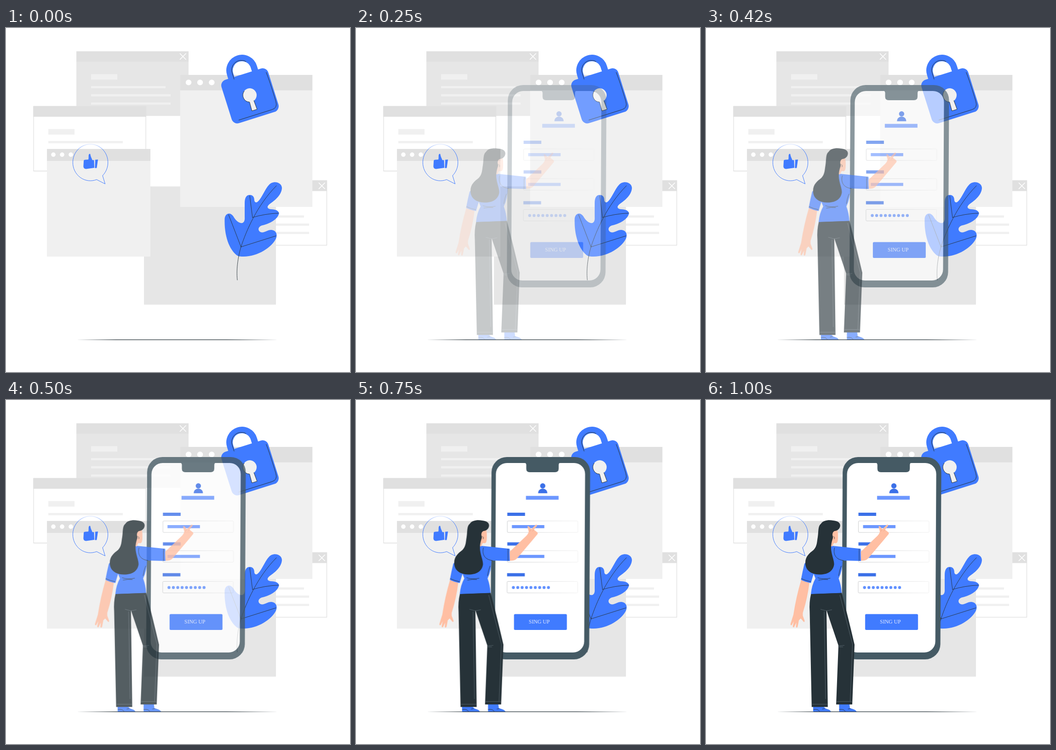
These frames come from a looping animation (748 px wide and 748 px high, 1040 ms). An HTML page:

```html
<!DOCTYPE html>
<html lang="en">
<head>
<meta charset="utf-8">
<title>Sign up</title>
<style>
  html, body { margin: 0; width: 100%; height: 100%; overflow: hidden; background: #fff; }
  svg { display: block; width: 100%; height: 100%; }
  .blue { fill: #407bff; }
  .deep { fill: #3b70e8; }
  .soft { fill: #6c97ff; }
  .dark { fill: #263238; }
  .skin { fill: #ffbfa3; }
  .head { fill: #e0e0e0; }
  .pane { fill: #e6e6e6; }
  .pale { fill: #f0f0f0; }
  .white { fill: #fff; }
  .frame { fill: #fff; stroke: #e0e0e0; stroke-width: 1.3; }
  .line { fill: none; stroke: #263238; stroke-width: .9; stroke-linecap: round; }
  .seam { fill: none; stroke: #64727a; stroke-width: .7; }
  .cross { fill: none; stroke: #fff; stroke-width: 1.6; }
  .field { fill: none; stroke: url(#fade); stroke-width: .9; }
  .label { font: 11.8px "Liberation Serif", "Times New Roman", serif; fill: #e8eeff; text-anchor: middle; }

  /* Slides in from the right with an overshoot, then rests until the loop restarts. */
  .enter { animation: enter 1040ms infinite; }
  @keyframes enter {
    0% { opacity: 0; transform: translateX(44.9px); animation-timing-function: cubic-bezier(.352, .043, .5, 1.373); }
    94.13%, 100% { opacity: 1; transform: translateX(0); }
  }
</style>
</head>
<body>
<svg viewBox="0 0 748 748">
  <defs>
    <linearGradient id="fade">
      <stop offset="0" stop-color="#c4c6c8"/>
      <stop offset="1" stop-color="#efefef"/>
    </linearGradient>
    <linearGradient id="rim" x1="0" y1="0" x2="0" y2="1">
      <stop offset="0" stop-color="#407bff" stop-opacity=".2"/>
      <stop offset=".15" stop-color="#407bff"/>
    </linearGradient>
    <g id="lines" class="pale">
      <path d="M32 49.500h57v12h-57zM32 75.500h162v4.700h-162zM32 93.300h173v4.700h-173zM32 111.300h173v4.700h-173z"/>
    </g>
    <path id="cross" class="cross" d="M225 4.500l13.500 13.500M238.500 4.500L225 18"/>
  </defs>

  <!-- Windows -->
  <g transform="translate(153 50.700)">
    <path class="pane" d="M0 0h244v140.500H0z"/>
    <path class="head" d="M0 0h244v22.500H0z"/>
    <use href="#lines"/>
    <use href="#cross"/>
  </g>
  <g transform="translate(60 170.300)">
    <path class="frame" d="M0 0h244v140.700H0z"/>
    <path class="head" d="M-.6-.6h245.200v23.400H-.6z"/>
    <use href="#lines"/>
  </g>
  <g transform="translate(454 332)">
    <path class="frame" d="M0 0h243.500v140.300H0z"/>
    <path class="head" d="M-.6-.6h244.700v23H-.6z"/>
    <use href="#lines"/>
    <use href="#cross" x="1"/>
  </g>
  <path class="pane" d="M300 344.500h287v257H300z"/>
  <path class="pale" d="M378.700 102h287.500v287H378.700z"/>
  <path class="head" d="M378.700 102h287.500v33.600H378.700z"/>
  <g class="white">
    <circle cx="397" cy="118.400" r="6.200"/>
    <circle cx="422" cy="118.400" r="6.200"/>
    <circle cx="447.300" cy="118.400" r="6.200"/>
  </g>
  <path class="pale" d="M89 263h225v234H89z"/>
  <path class="head" d="M89 263h225v26H89z"/>
  <g class="white">
    <circle cx="103" cy="275.400" r="4.800"/>
    <circle cx="122" cy="275.400" r="4.800"/>
    <circle cx="141" cy="275.400" r="4.800"/>
  </g>

  <!-- Speech bubble -->
  <path d="M197 329.600L215.500 339L210 321A38.200 39.800 0 1 0 197 329.600z" fill="none" stroke="url(#rim)"/>
  <path class="blue" d="M169 289Q169 286.500 172 286.500L179 286C180.500 282 178.500 276 181 274Q183.500 272 183.800 277C184.500 281 187 284 187.500 287L191.500 287.500L192 304L174 306.500Q168.500 306 168.300 301zM194 286.500L200 286L197.300 304.500L193.200 304.500z"/>

  <!-- Lock -->
  <g transform="translate(530.500 147.500) rotate(-17.500)">
    <path d="M-27-42V-58A27 27 0 0 1 27-58V-42" fill="none" stroke="#407bff" stroke-width="14"/>
    <rect class="blue" x="-53.300" y="-49.500" width="106.600" height="99" rx="13"/>
    <path class="line" d="M-22-45V-58A21 21 0 0 1 14-74"/>
    <path class="line" d="M49-38Q50.500-20 50 28Q50 43 37 43H-39"/>
    <path class="pale" d="M-5 12.600A15 15 0 1 1 5 12.600L6 32.500H-5.800z"/>
    <path class="line" d="M5 12.600L6 32.500H-5.800L-5 12.600A15 15 0 0 1 -9-13.500"/>
  </g>

  <!-- Leaf -->
  <path class="blue" d="M505 496C488 486 474 456 475.500 414C477 402 488 400 494 409C500 420 508 425 514 424C518 422 519.500 418 519 411V381C519 367 524 363 530 363C538 363 540 369 540 375C541 380 545 381 550 375C560 363 566 343 577 337C589 332 600 339 600 348C599 363 586 374 573 383C567 388 567 393 575 394C587 394 594 398 593.500 404C590 416 575 425 558 429C549 431 546 439 553 443.500C561 447 567 439 577 439C587 440 591 448 587 458C577 479 540 502 505 496z"/>
  <path class="line" d="M503 548C500 522 506 492 511 476C522 442 546 385 588 343M511 476L484 406M511 476L587 452M536 412L530 365M536 412Q562 404 593 402.500"/>

  <!-- Floor -->
  <path class="dark" d="M152 678L240 677.300H480L593 678L480 678.600H240z"/>

  <!-- Phone -->
  <g class="enter">
    <g transform="skewX(-.31)">
      <rect x="298" y="124" width="214.500" height="440" rx="33" fill="#455a64"/>
      <rect class="white" x="307.500" y="137" width="194" height="412" rx="24"/>
      <path d="M371 136.500Q373.500 138 373.500 141V149Q373.500 157 381 157H436Q444 157 444 149V141Q444 138 446 136.500z" fill="#455a64"/>
    </g>
    <circle class="deep" cx="408.500" cy="186.700" r="5.700"/>
    <path class="deep" d="M398.500 202.700C398.500 189.500 418.500 189.500 418.500 202.700z"/>
    <path class="soft" d="M372 208.500h71v8.300h-71zM341.500 272h70.500v6.700h-70.500zM341.500 336.700h70.500v6.700h-70.500z"/>
    <path class="deep" d="M331.500 245h38.500v7h-38.500zM331.500 309.600h38.500v7h-38.500zM331 376.600h38.500v7h-38.500z"/>
    <rect class="field" x="331.500" y="263" width="153.500" height="25" rx="2"/>
    <rect class="field" x="331.500" y="327.700" width="153.500" height="25" rx="2"/>
    <rect class="field" x="331" y="394.500" width="153.500" height="25" rx="2"/>
    <path d="M344.700 407.800h77" fill="none" stroke="#6090ff" stroke-width="6.400" stroke-linecap="round" stroke-dasharray="0 9.530"/>
    <rect class="blue" x="346" y="465.500" width="115" height="34.500" rx="2.500"/>
    <text class="label" x="401" y="486.300">SING UP</text>
  </g>

  <!-- Woman -->
  <g class="enter">
    <path class="blue" d="M233 667H256Q259 671 265 672.500Q271 674 271.500 678H233zM289.500 661.500H312L313 670Q326 673 327.500 678H289.500z"/>
    <path class="line" d="M234 673Q243 671 247 677M253 672L258 671M290 673Q299 671 303 677M309 672L314 671M234 677.700H271M290 677.700H327"/>
    <path class="skin" d="M207 391L225 396Q221 430 210.500 463L210.500 469L214.500 480Q214.500 484 212 482L206 475L202 479L199.300 493Q197 497 195.500 493L196.500 484L191.500 494Q188 495.500 189 490L191 481L186.500 489.500Q183 490.500 184 486L190 467Q196 428 207 391z"/>
    <path class="dark" d="M228.500 421L295 418.500Q309 472 323 532L318 662H283L288 534L262 457L264.800 667.500H229.800L225.500 460Q224 440 228.500 421z"/>
    <path class="seam" d="M249 455L262 458.500L274 456M257 460L260 650M291 424L318.500 531L313.500 655M287 535L301 533.500M289 537L298 537M231 661.500H264M284 655.500H317"/>
    <path class="blue" d="M214 356Q210 372 206.500 391Q216 396 228 398L234 378L238 388Q230 402 228 422L295 419.500Q294 403 288.500 388Q297 370 297 349L337 350L336.500 323.500L274 317L240 330z"/>
    <path class="line" d="M279.500 321.500C276 334 281 347 299 349M333 324V349.500M207.500 388.500Q217 393 227.500 395M243 386.500Q255 390.500 270 387.500M245 391.500Q256 389.500 265 390.500M294 361Q290 370 288.500 382M230 422.500L294 420.300"/>
    <path class="skin" d="M272 286L285.500 281Q287.500 290 287 299Q287 310 283 311.500L278 311L274.500 318.500L268 317z"/>
    <path class="line" d="M277.500 297Q280.500 298 279 302"/>
    <path class="dark" d="M250 269C255 261 268 260.500 276 262C288 263 293 268 291.500 275C290 282 284 284.500 279 285Q274.500 288 275 294Q277 298 275 303C272 312 271 322 273 331C275 342 279 350 278.500 358C276 374 262 380 246 379.500C228 379 216 370 216 354C216 340 225 333 234 326C242 317 241 309 243 298C245 286 243 274 250 269z"/>
    <path class="skin" d="M336.500 330L370 298Q377 292 378 286L375.300 275.500Q376.500 272.500 379 275.500L383.500 281L393.500 271Q396.500 270.500 396 273.500L389.500 282L397 288Q398.500 290.500 396 293L386 305L352 345Q347 350 337 349.500z"/>
    <path d="M383 281L380 286M389.500 282L386 285.500" fill="none" stroke="#e89a7e" stroke-width=".7"/>
  </g>
</svg>
</body>
</html>
```
